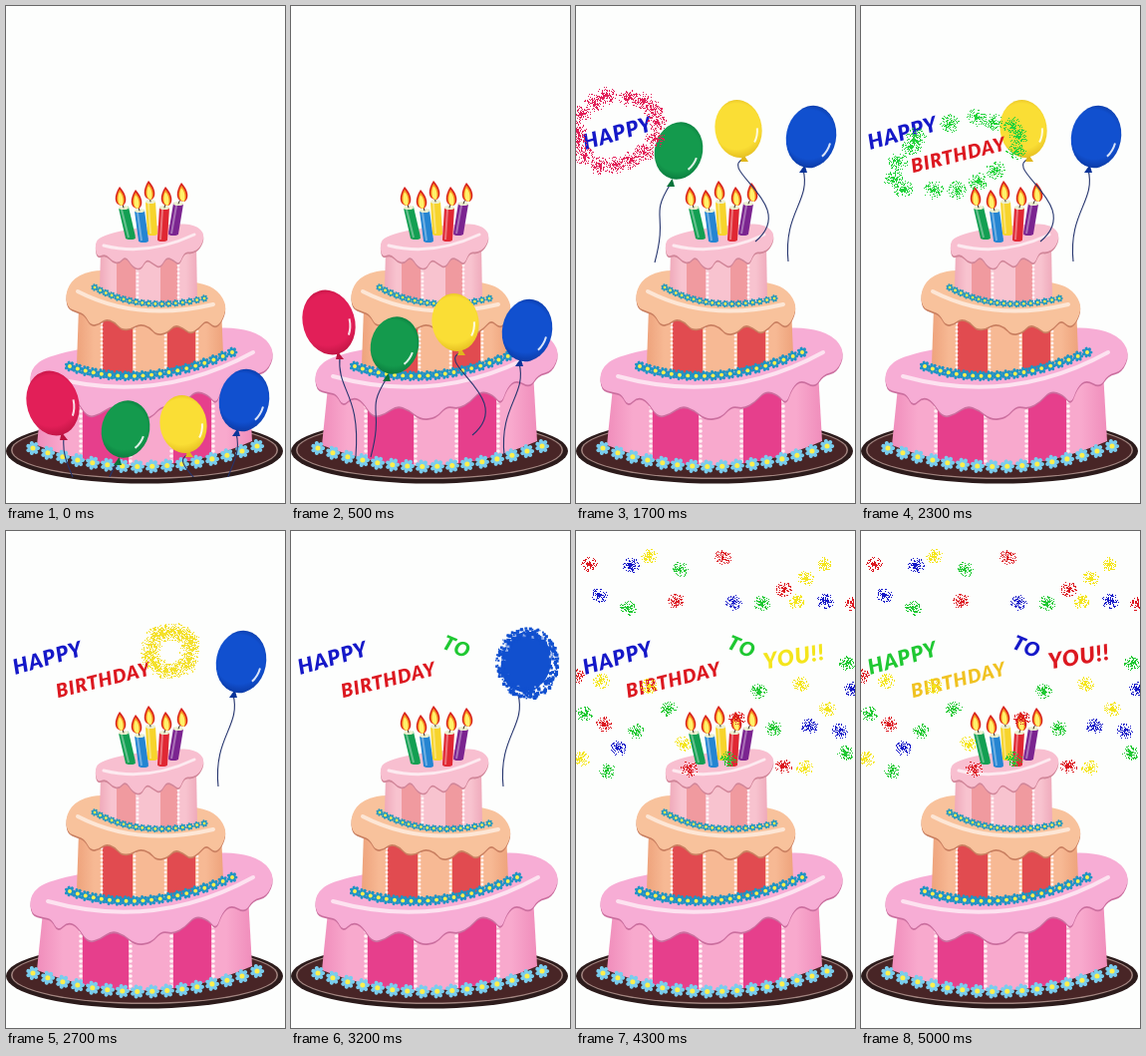
Write an HTML page with a canvas that moves like this. It is 280x498 px and loops after 5.1 s.

```html
<!DOCTYPE html>
<html lang="en">
<head>
<meta charset="utf-8">
<title>Birthday cake</title>
<style>
html, body { margin: 0; width: 100%; height: 100%; overflow: hidden; background: #fdfefd; }
canvas { display: block; width: 100vw; height: 100vh; }
</style>
</head>
<body>
<canvas id="stage" width="280" height="498"></canvas>
<script>
const stage = document.getElementById('stage');
const screen2d = stage.getContext('2d');
const LOOP = 5100, STEP = 100, TAU = Math.PI * 2;
const BLUE = '#1518c8', RED = '#dc1820', GREEN = '#1fc832', YELLOW = '#f4e51c', GOLD = '#f0c222';

const lerp = (a, b, k) => a + (b - a) * k;
const clamp = k => Math.max(0, Math.min(1, k));

function random(seed) {
  let s = seed * 7919 + 13;
  return () => {
    s = (s + 0x6D2B79F5) | 0;
    let n = Math.imul(s ^ (s >>> 15), 1 | s);
    n ^= n + Math.imul(n ^ (n >>> 7), 61 | n);
    return ((n ^ (n >>> 14)) >>> 0) / 4294967296;
  };
}

let g = screen2d;

function oval(x, y, rx, ry, fill, tilt = 0) {
  g.beginPath();
  g.ellipse(x, y, rx, ry, tilt, 0, TAU);
  g.fillStyle = fill;
  g.fill();
}

// Closed soft outline through the midpoints of the given points.
function blob(pts, fill, dy = 0) {
  const mid = (a, b) => [(a[0] + b[0]) / 2, (a[1] + b[1]) / 2 + dy];
  g.beginPath();
  g.moveTo(...mid(pts[pts.length - 1], pts[0]));
  pts.forEach((p, i) => g.quadraticCurveTo(p[0], p[1] + dy, ...mid(p, pts[(i + 1) % pts.length])));
  g.closePath();
  g.fillStyle = fill;
  g.fill();
}

function arc([x0, y0, cx, cy, x1, y1], color, width) {
  g.beginPath();
  g.moveTo(x0, y0);
  g.quadraticCurveTo(cx, cy, x1, y1);
  g.strokeStyle = color;
  g.lineWidth = width;
  g.lineCap = 'round';
  g.stroke();
}

function flowers([x0, y0, cx, cy, x1, y1], count, r, petal) {
  for (let i = 0; i < count; i++) {
    const k = i / (count - 1), m = 1 - k;
    const x = m * m * x0 + 2 * m * k * cx + k * k * x1;
    const y = m * m * y0 + 2 * m * k * cy + k * k * y1;
    for (let j = 0; j < 7; j++) {
      const a = j * TAU / 7;
      oval(x + Math.cos(a) * r * .62, y + Math.sin(a) * r * .62, r * .4, r * .3, petal, a);
    }
    oval(x, y, r * .36, r * .36, '#fff04e');
  }
}

function tier(o) {
  const [xl, yl, bl, hl, xr, yr, br, hr, sag] = o.side;
  g.save();
  g.beginPath();
  g.moveTo(xl, yl);
  g.lineTo(bl, hl);
  g.quadraticCurveTo((bl + br) / 2, sag, br, hr);
  g.lineTo(xr, yr);
  g.closePath();
  g.clip();
  const shade = g.createLinearGradient(bl, 0, br, 0);
  shade.addColorStop(0, o.edge);
  shade.addColorStop(.12, o.body);
  shade.addColorStop(.88, o.body);
  shade.addColorStop(1, o.edge);
  g.fillStyle = shade;
  g.fillRect(0, 200, 280, 290);
  g.fillStyle = o.stripe;
  for (const [a, b] of o.stripes) g.fillRect(a, 200, b - a, 290);
  for (const x of o.dots)
    for (let y = yr; y < sag; y += o.gap) oval(x, y, o.gap * .36, o.gap * .36, '#fff2f4');
  g.restore();
  blob(o.icing, o.shadow, 1.8);
  blob(o.icing, o.cream);
  arc(o.shine, o.gloss, o.shineWidth);
}

function candle(x0, y0, x1, y1, color, fx, fy) {
  g.lineCap = 'butt';
  g.lineWidth = 10;
  g.strokeStyle = color;
  g.beginPath();
  g.moveTo(x0, y0);
  g.lineTo(x1, y1);
  g.stroke();
  oval(x1, y1, 5, 2, color);
  g.lineWidth = 2;
  g.strokeStyle = 'rgba(255,255,255,.35)';
  g.beginPath();
  g.moveTo(x0 - 2, y0 + 2);
  g.lineTo(x1 - 2, y1);
  g.stroke();
  oval(x0, y0, 5, 2, '#ecf0d0');
  arc([x0, y0, x0, y0 - 3, fx, fy + 6], '#40302c', 1);
  const flame = (s, fill) => {
    g.beginPath();
    g.moveTo(fx - 1, fy - 10 * s);
    g.bezierCurveTo(fx + 9 * s, fy + s, fx + 5 * s, fy + 9, fx + 1, fy + 9);
    g.bezierCurveTo(fx - 7 * s, fy + 8, fx - 7 * s, fy - s, fx - 1, fy - 10 * s);
    g.fillStyle = fill;
    g.fill();
  };
  flame(1, '#d8201c');
  flame(.72, '#f79220');
  flame(.48, '#fff26a');
}

function drawCake() {
  oval(139, 446, 139, 32.5, '#2c1b1b');
  oval(139, 445, 134, 29, '#a28580');
  oval(139, 445, 132.5, 27.6, '#482526');
  tier({
    side: [37, 382, 31, 440, 243, 366, 247, 436, 483],
    body: '#f8a9cd', edge: '#f08dbb', stripe: '#e63f8c',
    stripes: [[77, 123], [168, 206]], dots: [75, 125, 166, 208], gap: 5,
    icing: [[24, 364], [25, 384], [38, 387], [46, 389], [52, 401], [62, 391], [72, 396], [82, 412],
      [95, 408], [106, 400], [118, 404], [130, 414], [146, 412], [156, 400], [168, 403], [180, 396],
      [190, 385], [203, 389], [211, 399], [217, 382], [226, 374], [240, 382], [248, 369], [262, 366],
      [270, 347], [258, 330], [232, 322], [200, 323], [110, 337], [42, 350]],
    cream: '#f7add5', shadow: '#cb6f9f', gloss: '#fde2f0',
    shine: [42, 371, 150, 401, 248, 347], shineWidth: 4
  });
  flowers([27, 443, 139, 481, 252, 441], 16, 7, '#79cdee');
  tier({
    side: [73, 302, 71, 359, 216, 302, 218, 349, 388],
    body: '#f7b994', edge: '#eea37c', stripe: '#e14b50',
    stripes: [[97, 127], [162, 190]], dots: [96, 129, 160, 192], gap: 4,
    icing: [[60, 284], [61, 302], [72, 306], [79, 309], [85, 320], [94, 318], [100, 313], [109, 316],
      [116, 324], [126, 323], [134, 318], [144, 321], [151, 329], [162, 327], [169, 319], [178, 322],
      [185, 328], [194, 322], [201, 314], [209, 322], [216, 317], [222, 301], [213, 285], [196, 277],
      [100, 263], [72, 269]],
    cream: '#f8c29c', shadow: '#c97f60', gloss: '#fde6d5',
    shine: [72, 286, 132, 317, 208, 299], shineWidth: 4
  });
  flowers([64, 361, 138, 386, 227, 347], 20, 5.4, '#1f93c4');
  tier({
    side: [95, 246, 94, 281, 191, 240, 192, 293, 312],
    body: '#f8c3cf', edge: '#efaabb', stripe: '#f09a9f',
    stripes: [[111, 130], [155, 172]], dots: [132, 173], gap: 4,
    icing: [[89, 236], [91, 252], [100, 248], [107, 256], [114, 257], [120, 250], [127, 261], [135, 264],
      [141, 253], [148, 258], [155, 262], [161, 251], [168, 254], [174, 259], [179, 246], [187, 247],
      [195, 242], [200, 229], [190, 219], [168, 218], [120, 224], [98, 230]],
    cream: '#f8bfd0', shadow: '#d18699', gloss: '#fdeaf0',
    shine: [98, 240, 142, 251, 189, 229], shineWidth: 3
  });
  flowers([89, 282, 136, 308, 199, 293], 18, 3.7, '#2398bd');
  candle(118, 202, 125, 232, '#139f52', 115, 191);
  candle(134, 205, 138, 235, '#2585d2', 131, 194);
  candle(145, 196, 147, 228, '#f7d42c', 144, 185);
  candle(159, 202, 157, 234, '#e02833', 161, 191);
  candle(173, 198, 168, 228, '#7b2490', 177, 187);
}

// path: start, meeting point and end; string: bezier offsets from the balloon centre.
const balloons = [
  { path: [47, 398, 38, 317, 36, 122], rx: 26, ry: 33, tilt: -.3, color: '#e21f58', dark: '#b9123f',
    burst: 1200, knot: [11, 34], string: [8, 70, 32, 70, 27, 134], ring: [42, 124, 44, 38, -.25] },
  { path: [120, 424, 104, 340, 103, 145], rx: 24, ry: 29, tilt: .26, color: '#149a4d', dark: '#08733a',
    burst: 1900, knot: [-8, 33], string: [-30, 68, -10, 60, -24, 112], ring: [96, 149, 69, 35, -.3] },
  { path: [178, 419, 165, 317, 163, 123], rx: 23.5, ry: 29, tilt: -.16, color: '#fade35', dark: '#e0b71c',
    burst: 2500, knot: [6, 30], string: [-24, 40, 62, 76, 17, 113], ring: [167, 116, 38, 37, 0] },
  { path: [239, 395, 237, 325, 236, 131], rx: 25, ry: 31.5, tilt: .2, color: '#1150cf', dark: '#0a3499',
    burst: 3200, knot: [-8, 33], string: [0, 65, -28, 75, -23, 125] }
];
const splashColors = ['#e21f58', '#20d23a', '#f4e02c', '#1546c4'];

function place(b, t) {
  const [x0, y0, x1, y1, x2, y2] = b.path;
  const k = t / 500, m = clamp((t - 500) / 600);
  return t <= 500 ? [lerp(x0, x1, k), lerp(y0, y1, k)] : [lerp(x1, x2, m), lerp(y1, y2, m)];
}

function drawString(b, x, y) {
  const [kx, ky] = b.knot, s = b.string;
  g.save();
  g.beginPath();
  g.rect(0, 0, 280, 472);
  g.clip();
  g.beginPath();
  g.moveTo(x + kx, y + ky);
  g.bezierCurveTo(x + s[0], y + s[1], x + s[2], y + s[3], x + s[4], y + s[5]);
  g.strokeStyle = '#26356e';
  g.lineWidth = 1.1;
  g.stroke();
  g.restore();
}

function drawBalloon(b, x, y) {
  const [kx, ky] = b.knot;
  const fill = g.createRadialGradient(x - 5, y - 7, 6, x, y, b.ry + 3);
  fill.addColorStop(0, b.color);
  fill.addColorStop(.65, b.color);
  fill.addColorStop(1, b.dark);
  g.beginPath();
  g.moveTo(x + kx * .8, y + ky - 5);
  g.lineTo(x + kx - 4, y + ky + 3);
  g.lineTo(x + kx + 4, y + ky + 3);
  g.fillStyle = b.dark;
  g.fill();
  oval(x, y, b.rx, b.ry, fill, b.tilt);
  g.beginPath();
  g.ellipse(x, y, b.rx * .8, b.ry * .8, b.tilt, .1, .75);
  g.strokeStyle = 'rgba(255,255,255,.85)';
  g.lineWidth = 2;
  g.stroke();
}

function drawRough(b, x, y) {
  const rnd = random(b.burst);
  oval(x, y, b.rx, b.ry - 1, b.color, b.tilt);
  for (let i = 0; i < 420; i++) {
    const a = rnd() * TAU, k = .82 + rnd() * .33, s = 1 + rnd() * 2.4;
    g.fillStyle = rnd() < .12 && k < 1 ? '#ffffff90' : b.color;
    g.fillRect(x + Math.cos(a) * (b.rx + 2) * k, y + Math.sin(a) * b.ry * k, s, s);
  }
}

function splat(x, y, r, color, seed) {
  const rnd = random(seed);
  g.fillStyle = color;
  for (let i = 0; i < r * 13; i++) {
    const a = rnd() * TAU, d = r * rnd();
    g.fillRect(Math.round(x + Math.cos(a) * d), Math.round(y + Math.sin(a) * d * .9), 1, 1);
  }
}

function drawSplash(b, i, t) {
  const age = t - b.burst;
  if (!b.ring || age <= 0 || age >= 600) return;
  const [cx, cy, rx, ry, tilt] = b.ring, [x, y] = place(b, t);
  const k = clamp(age / 350), rnd = random(i + 5);
  for (let j = 0; j < 15; j++) {
    const a = j * TAU / 15 + rnd() * .2, s = .86 + rnd() * .16;
    const u = Math.cos(a) * rx * s, v = Math.sin(a) * ry * s;
    const tx = cx + u * Math.cos(tilt) - v * Math.sin(tilt);
    const ty = cy + u * Math.sin(tilt) + v * Math.cos(tilt);
    splat(lerp(x, tx, k), lerp(y, ty, k), 10, splashColors[i], j + i * 40);
  }
}

const confetti = [
  [RED, [13, 33, 147, 26, 100, 70, 208, 58, 28, 193, 113, 238, 208, 235, 278, 72, 161, 188, 0, 145]],
  [BLUE, [55, 34, 23, 64, 158, 71, 250, 70, 42, 217, 234, 195, 264, 200, 277, 158]],
  [GREEN, [104, 38, 52, 77, 186, 72, 183, 160, 8, 183, 60, 200, 93, 178, 31, 240, 153, 228, 198, 197, 272, 132, 270, 222]],
  [YELLOW, [73, 25, 249, 33, 230, 47, 221, 70, 25, 150, 73, 155, 225, 153, 107, 213, 5, 228, 252, 178, 229, 237]]
];

function drawConfetti(t) {
  if (t <= 3200) return;
  const k = clamp((t - 3200) / 400);
  confetti.forEach(([color, at], c) => {
    for (let i = 0; i < at.length; i += 2)
      splat(lerp(236, at[i], k), lerp(131, at[i + 1], k), 8.5, color, c * 50 + i);
  });
}

const words = [
  { text: 'HAPPY', x: 42, y: 128, tilt: -.28, size: 21, from: 1500, colors: [BLUE, GREEN] },
  { text: 'BIRTHDAY', x: 98, y: 150, tilt: -.24, size: 19, from: 2200, colors: [RED, GOLD] },
  { text: 'TO', x: 166, y: 117, tilt: .4, size: 20, from: 2800, colors: [GREEN, BLUE] },
  { text: 'YOU!!', x: 219, y: 127, tilt: -.16, size: 22, from: 3500, colors: [YELLOW, RED] }
];

function drawWord(w, t) {
  if (t < w.from) return;
  g.save();
  g.translate(w.x, w.y);
  g.rotate(w.tilt);
  g.font = `italic 900 ${w.size}px Lato, "Open Sans", sans-serif`;
  g.letterSpacing = '1px';
  g.textAlign = 'center';
  g.textBaseline = 'middle';
  g.fillStyle = w.colors[t < 4400 ? 0 : 1];
  g.fillText(w.text, 0, 0);
  g.restore();
}

const cake = document.createElement('canvas');
const density = Math.max(1, window.devicePixelRatio || 1);
for (const c of [stage, cake]) {
  c.width = 280 * density;
  c.height = 498 * density;
  c.getContext('2d').scale(density, density);
}
g = cake.getContext('2d');
drawCake();
g = screen2d;

function draw(t) {
  g.fillStyle = '#fdfefd';
  g.fillRect(0, 0, 280, 498);
  g.drawImage(cake, 0, 0, 280, 498);
  for (const b of balloons) {
    if (t > b.burst) continue;
    const [x, y] = place(b, t);
    drawString(b, x, y);
    (t === b.burst ? drawRough : drawBalloon)(b, x, y);
  }
  words.forEach(w => drawWord(w, t));
  balloons.forEach((b, i) => drawSplash(b, i, t));
  drawConfetti(t);
}

const start = performance.now();
let shown = -1;
function tick() {
  const t = Math.floor((performance.now() - start) % LOOP / STEP) * STEP;
  if (t !== shown) draw(shown = t);
  requestAnimationFrame(tick);
}
tick();
</script>
</body>
</html>
```
